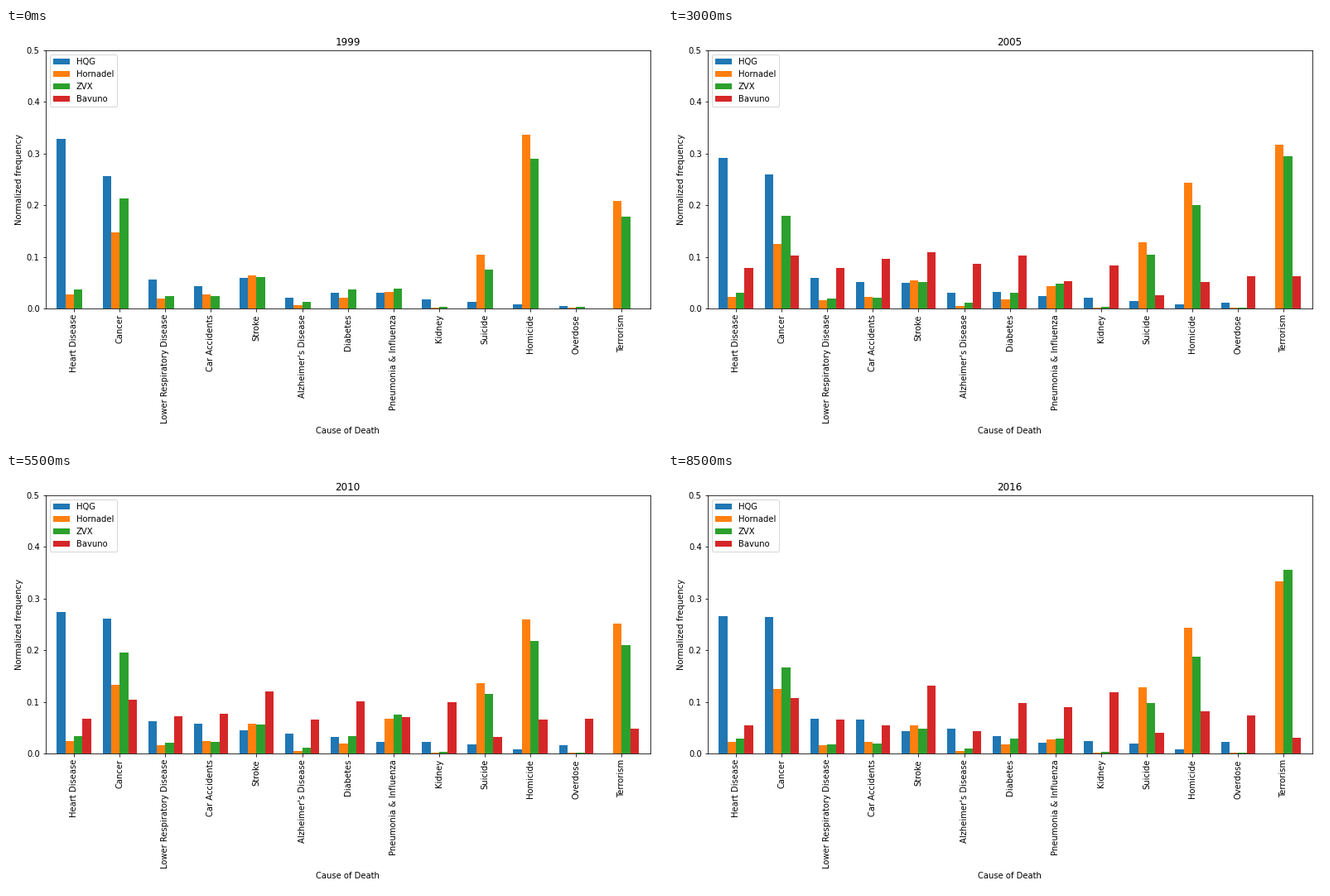
Write a matplotlib script that moves like this. It is 792 px wide and 504 px high and loops after 9 s.

```python
import matplotlib.pyplot as plt
import numpy as np
from matplotlib.animation import FuncAnimation

W, H, DPI = 792, 504, 72
FIRST, LAST = 1999, 2016
SEARCH_START = 2004
STEP_MS = 500
BAR = 0.75 / 4

plt.rcParams.update({"font.family": "DejaVu Sans", "font.size": 10})

CAUSES = [
    "Heart Disease", "Cancer", "Lower Respiratory Disease", "Car Accidents",
    "Stroke", "Alzheimer's Disease", "Diabetes", "Pneumonia & Influenza",
    "Kidney", "Suicide", "Homicide", "Overdose", "Terrorism",
]
FLU, SUICIDE, HOMICIDE = 7, 9, 10

# All levels are in thousandths, ordered as in CAUSES.
DEATHS_START = [328, 256, 56, 43, 59, 21, 31, 30, 18, 13, 8, 5, 0]
DEATHS_END = [266, 264, 67, 65, 43, 48, 33, 21, 24, 19, 8, 23, 0]
SEARCH_FROM = [78, 103, 78, 96, 109, 86, 103, 53, 83, 26, 51, 62, 62]
SEARCH_TO = [54, 107, 66, 54, 132, 43, 98, 90, 119, 40, 82, 74, 30]

# Usual mix of news stories, terrorism aside.
MIX_A = [33, 184, 23, 33, 80, 7, 26, 40, 2, 190, 360, 2]
MIX_B = [44, 255, 28, 29, 73, 15, 43, 45, 4, 150, 285, 3]

# Terrorism's part of the news at a few turning points.
TURNS = [1999, 2000, 2001, 2003, 2005, 2009, 2012, 2016]
TERROR_A = [208, 220, 433, 327, 317, 261, 234, 333]
TERROR_B = [178, 190, 479, 392, 295, 211, 206, 356]


def drift(start, end, t, power=1):
    """Rising causes grow steadily, falling ones level off by the power."""
    start, end = np.array(start), np.array(end)
    ease = np.where(end < start, 1 - (1 - t) ** power, t)
    return start + (end - start) * ease


def deaths(year):
    return drift(DEATHS_START, DEATHS_END, (year - FIRST) / (LAST - FIRST), 2)


def searches(year):
    if year < SEARCH_START:
        return np.zeros(len(CAUSES))
    t = max(0, (year - SEARCH_START - 1) / (LAST - SEARCH_START - 1))
    return drift(SEARCH_FROM, SEARCH_TO, t)


def news(mix, terror):
    """Terrorism takes its part; the other stories share what is left."""
    def levels(year):
        rest = np.array(mix, float)
        rest[FLU] += 100 * np.exp(-((year - 2008) / 2.5) ** 2)
        shift = 60 * np.exp((FIRST - year) / 1.5)
        rest[HOMICIDE] += shift
        rest[SUICIDE] -= shift
        top = np.interp(year, TURNS, terror)
        return np.append(rest / rest.sum() * (995 - top), top)
    return levels


SERIES = {
    "HQG": deaths,
    "Hornadel": news(MIX_A, TERROR_A),
    "ZVX": news(MIX_B, TERROR_B),
    "Bavuno": searches,
}

fig = plt.figure(figsize=(W / DPI, H / DPI), dpi=DPI, facecolor="white")
ax = fig.add_axes([47.645 / W, 165 / H, 730.075 / W, 312 / H])

pos = np.arange(len(CAUSES))
groups = [
    ax.bar(pos + (i - 2) * BAR, levels(FIRST) / 1000, BAR, align="edge",
           color=f"C{i}", label=name)
    for i, (name, levels) in enumerate(SERIES.items())
]
ax.set_xlim(-0.625, len(CAUSES) - 0.375)
ax.set_ylim(0, 0.5)
ax.set_yticks(np.arange(6) / 10)
ax.set_xticks(pos, CAUSES, rotation=90)
ax.set_xlabel("Cause of Death")
ax.set_ylabel("Normalized frequency")
ax.legend(loc="upper left")
title = ax.set_title(str(FIRST), fontsize=12)


def draw(i):
    year = FIRST + i
    title.set_text(str(year))
    for bars, levels in zip(groups, SERIES.values()):
        for bar, level in zip(bars, levels(year)):
            bar.set_height(level / 1000)
    return [title, *(bar for bars in groups for bar in bars)]


anim = FuncAnimation(fig, draw, frames=LAST - FIRST + 1, interval=STEP_MS,
                     init_func=lambda: draw(0), repeat=True, repeat_delay=0)
plt.show()
```
